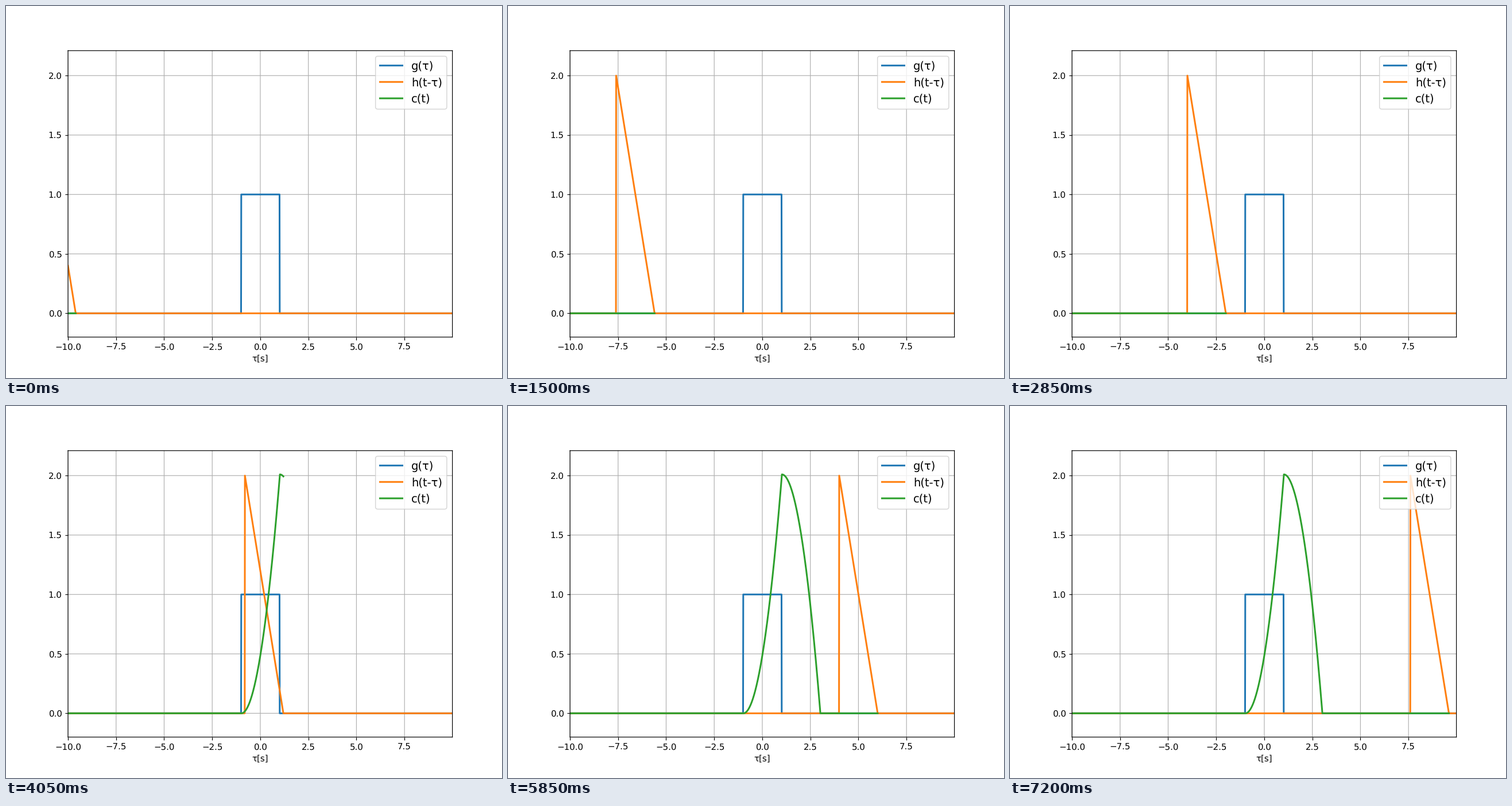
Recreate the animation shown at these times as a matplotlib script. Size 864 by 648 pixels, loop 7350 ms.

```python
import numpy as np
import matplotlib.pyplot as plt
from matplotlib.animation import FuncAnimation

plt.rcParams.update({
    "font.family": "DejaVu Sans",
    "text.hinting": "none",
    "path.snap": False,
})

DT = 0.01
FRAMES, INTERVAL = 49, 150
START, STEP = -960, 40  # time shift in samples

n = np.arange(-1000, 1000)
tau = n * DT


def ramp(k):
    """Ramp of slope 1 on [0, 2], zero elsewhere; k in samples."""
    return np.where((k >= 0) & (k <= 200), k * DT, 0.0)


g = np.where((n > -100) & (n <= 100), 1.0, 0.0)
c = np.convolve(g, ramp(n), mode="same") * DT

fig, ax = plt.subplots(figsize=(8, 6), dpi=108)
ax.set_xlim(tau[0], tau[-1])
ax.set_ylim(-0.2, c.max() + 0.2)
ax.set_xlabel("τ[s]")
ax.grid(True)

ax.plot(tau, g, lw=2, label="g(τ)")
h_line, = ax.plot([], [], lw=2, label="h(t-τ)")
c_line, = ax.plot([], [], lw=2, label="c(t)")
ax.legend(loc="upper right", fontsize=13, labelspacing=0.473)


def update(i):
    t = START + STEP * i
    shown = n <= t
    h_line.set_data(tau, ramp(t - n))
    c_line.set_data(tau[shown], c[shown])
    return h_line, c_line


anim = FuncAnimation(fig, update, frames=FRAMES, interval=INTERVAL,
                     repeat=True, repeat_delay=0)
plt.show()
```
